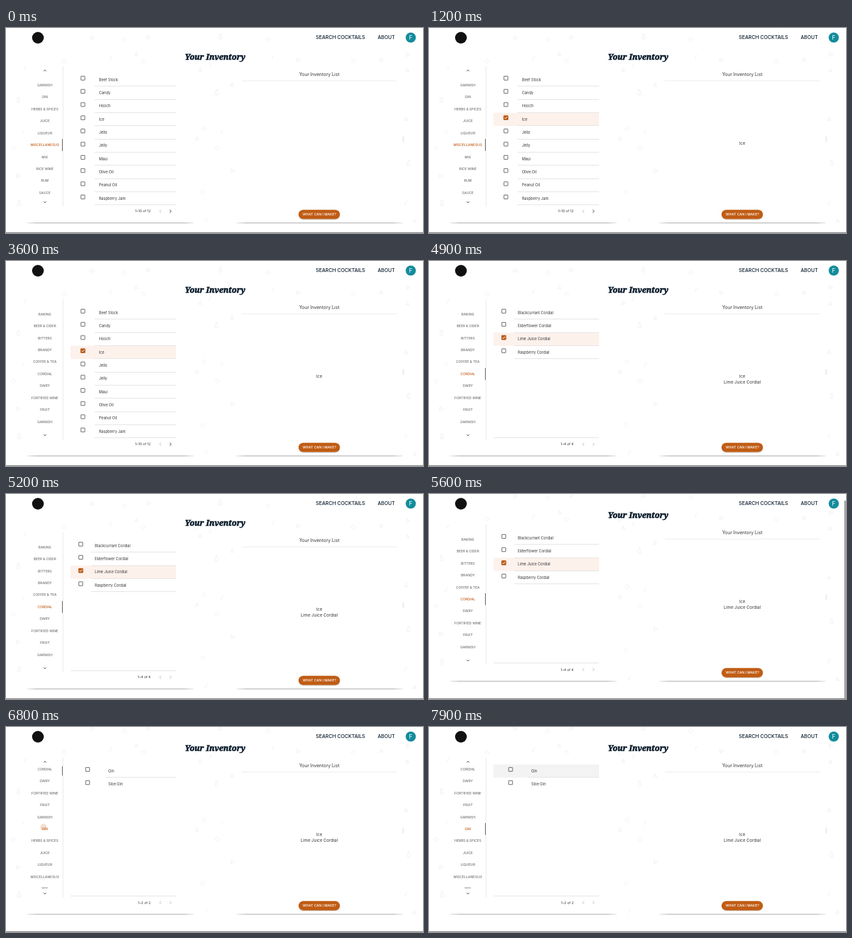
Recreate the animation shown at these times as an HTML page. Size 640 by 316 pixels, loop 8 s.

```html
<!DOCTYPE html>
<html lang="en">
<head>
<meta charset="utf-8">
<title>Your Inventory</title>
<style>
  html, body { margin: 0; width: 100%; height: 100%; overflow: hidden; background: #fff; }
  svg { display: block; width: 100vw; height: 100vh; }
  text { font-family: Inter, "Open Sans", sans-serif; fill: #333; }
  .title { font-family: "Noto Serif", serif; font-weight: 900; font-style: italic; fill: #0b1c2c; stroke: #0b1c2c; stroke-width: .65; }
  .nav { fill: #0b1c2c; font-weight: 500; }
  .tab { fill: #707070; font-weight: 500; }
  .tab.on { fill: #c05c14; }
  .white { fill: #fff; font-weight: 500; }
  .initial { fill: #fff; }
  .line { stroke: #e4e4e4; stroke-width: 1; shape-rendering: crispEdges; }
  .box { fill: none; stroke: #555; stroke-width: .9; }
  .icon { fill: none; stroke: #333; stroke-width: 1; }
  .icon.off { stroke: #bbb; }
  .doodle { fill: none; stroke: #ededed; stroke-width: .8; }
</style>
</head>
<body>
<svg viewBox="0 0 640 316" preserveAspectRatio="none">
  <defs>
    <clipPath id="tabView"><rect x="30" y="72.5" width="60" height="188.3"/></clipPath>
    <linearGradient id="edge">
      <stop offset="0" stop-color="#aaa" stop-opacity=".3"/>
      <stop offset=".06" stop-color="#aaa"/>
      <stop offset=".94" stop-color="#aaa"/>
      <stop offset="1" stop-color="#aaa" stop-opacity=".3"/>
    </linearGradient>
  </defs>
  <rect width="640" height="316" fill="#fff"/>
  <g id="page">
    <g id="doodles"></g>
    <g id="cards"></g>
    <g id="lists"></g>
    <g clip-path="url(#tabView)"><g id="tabs"></g></g>
  </g>
  <g id="header"></g>
</svg>
<script>
const LOOP = 8000, PITCH = 18.41, ROW = 20.35, ORANGE = '#c05c14';
const $ = id => document.getElementById(id);

function add(parent, tag, attrs) {
  const el = document.createElementNS('http://www.w3.org/2000/svg', tag);
  for (const key in attrs) el.setAttribute(key, attrs[key]);
  return parent.appendChild(el);
}
// y is the middle of the capitals
function label(parent, x, y, size, str, cls = '', anchor = 'middle') {
  const el = add(parent, 'text', { x, y: y + size * .36, 'font-size': size, class: cls, 'text-anchor': anchor });
  el.textContent = str;
  return el;
}
const rect = (parent, x, y, width, height, fill, rx = 0) => add(parent, 'rect', { x, y, width, height, fill, rx });
const hline = (parent, x1, x2, y) => add(parent, 'line', { x1, x2, y1: y, y2: y, class: 'line' });
const icon = (parent, d, cls = '') => add(parent, 'path', { d, class: 'icon ' + cls });
const show = (el, on) => el.setAttribute('visibility', on ? 'visible' : 'hidden');
const move = (el, y) => el.setAttribute('transform', `translate(0 ${y})`);

// Background doodles
const shapes = ['M0-3.5 3.5 0 0 3.5-3.5 0Z', 'M-2.5-3 3 0-2.5 3Z', 'M-1-4h2v3l1 1v4h-4v-4l1-1Z', 'M-2 3Q-1-3 2-3', 'M-2.5 2.5 0-2.5 2.5 2.5Z'];
const spots = [
  [[182, 18], [89, 51], [211, 51], [533, 51], [11, 185], [304, 155], [302, 253], [324, 185], [292, 51], [402, 18]],
  [[133, 15], [219, 14], [19, 228], [348, 220], [449, 49], [617, 41]],
  [[19, 111], [323, 99], [20, 270], [329, 13], [618, 208]],
  [[161, 47], [30, 62], [314, 58], [27, 160], [332, 160], [537, 9], [614, 270], [410, 45], [308, 296]],
  [[200, 40], [293, 170], [347, 87], [576, 48], [614, 140], [298, 64], [616, 65], [627, 297]]
];
spots.forEach((list, i) => list.forEach(([x, y]) =>
  add($('doodles'), 'path', { d: shapes[i], class: 'doodle', transform: `translate(${x} ${y})` })));

// Cards
const cards = $('cards');
for (const [x, w] of [[32, 256], [353.5, 255.5]]) {
  rect(cards, x, 57, w, 243, '#fff');
  rect(cards, x, 300, w, 1, 'url(#edge)');
}
rect(cards, 609, 167, .7, 9, '#ccc');
label(cards, 321, 44.8, 12, 'Your Inventory', 'title');
label(cards, 480.8, 71, 7, 'Your Inventory List');
hline(cards, 362, 600, 81.5).setAttribute('opacity', .7);
rect(cards, 87, 59, 1, 216, '#eaeaea');
const upArrow = icon(cards, 'M58 66.5l1.8-1.8 1.8 1.8');
icon(cards, 'M58 267.5l1.8 1.8 1.8-1.8');
const picked = [label(cards, 480.7, 177.7, 6.5, 'Ice'), label(cards, 480.7, 186.7, 6.5, 'Lime Juice Cordial')];
rect(cards, 449, 281.6, 63.5, 14.4, '#000', 7.2).setAttribute('opacity', .13);
rect(cards, 449, 280.2, 63.5, 14.4, ORANGE, 7.2);
label(cards, 481, 287.4, 5.3, 'WHAT CAN I MAKE?', 'white');

// Ingredient lists
function makeList({ items, boxX, textX, lineX, lines, range, more, pick }) {
  const g = add($('lists'), 'g', {});
  const tint = rect(g, 99, 69.6 + ROW * (pick || 0), 162, ROW, pick ? '#fdf1ec' : '#f3f3f3');
  items.forEach((name, i) => {
    const y = 77.3 + ROW * i;
    add(g, 'rect', { x: boxX - 3, y: y - 3, width: 6, height: 6, rx: .3, class: 'box' });
    label(g, textX, y + 2.2, 5.7, name, '', 'start');
    if (i < lines) hline(g, lineX, 261, y + 12.4);
  });
  if (items.length < 10) hline(g, 99, 261, 272.4);
  const check = add(g, 'g', {});
  if (pick) {
    const y = 77.3 + ROW * pick;
    rect(check, boxX - 3.5, y - 3.5, 7, 7, ORANGE, .6);
    add(check, 'path', { d: `M${boxX - 2.1} ${y}l1.5 1.5 2.8-3`, fill: 'none', stroke: '#fff' });
  }
  label(g, 222, 282.5, 5.3, range, '', 'end');
  icon(g, 'M238 280.3l-2.2 2.2 2.2 2.2', 'off');
  icon(g, 'M251.4 280.3l2.2 2.2-2.2 2.2', more ? '' : 'off');
  return { g, tint, check };
}
const misc = makeList({
  items: ['Beef Stock', 'Candy', 'Hooch', 'Ice', 'Jello', 'Jelly', 'Maui', 'Olive Oil', 'Peanut Oil', 'Raspberry Jam'],
  boxX: 118, textX: 142.7, lineX: 136, lines: 10, range: '1–10 of 12', more: true, pick: 3
});
const cordial = makeList({
  items: ['Blackcurrant Cordial', 'Elderflower Cordial', 'Lime Juice Cordial', 'Raspberry Cordial'],
  boxX: 114.8, textX: 136.3, lineX: 131, lines: 4, range: '1–4 of 4', pick: 2
});
const gin = makeList({
  items: ['Gin', 'Sloe Gin'],
  boxX: 125.2, textX: 157, lineX: 152, lines: 1, range: '1–2 of 2'
});

// Category tabs
const tabs = $('tabs');
const tabY = i => 82 + PITCH * i;
const ripple = add(tabs, 'ellipse', { fill: ORANGE });
const names = ['BAKING', 'BEER & CIDER', 'BITTERS', 'BRANDY', 'COFFEE & TEA', 'CORDIAL', 'DAIRY', 'FORTIFIED WINE', 'FRUIT',
  'GARNISH', 'GIN', 'HERBS & SPICES', 'JUICE', 'LIQUEUR', 'MISCELLANEOUS', 'MIX', 'RICE WINE', 'RUM', 'SAUCE'];
const tabLabels = names.map((name, i) => label(tabs, 59.6, tabY(i), 5.15, name, 'tab'));
const marker = rect(tabs, 86, 0, 1, PITCH, '#6b625c');
const CORDIAL = 5, GIN = 10, MISC = 14;

// Header
const header = $('header');
add(header, 'circle', { cx: 49, cy: 15, r: 9, fill: '#111' });
label(header, 513.4, 14.7, 7.55, 'SEARCH COCKTAILS', 'nav');
label(header, 583.7, 14.7, 7.45, 'ABOUT', 'nav');
add(header, 'circle', { cx: 621.2, cy: 14.7, r: 7.8, fill: '#128c9c' });
label(header, 621.2, 14.8, 9, 'F', 'initial');
rect(header, 0, 315, 640, 1, '#777');
const scrollbar = rect(header, 637.6, 10, 2, 305, '#888', 1);

// Motion
const ease = (t, start, length) => {
  const p = Math.min(1, Math.max(0, (t - start) / length));
  return p * p * (3 - 2 * p);
};
const wheel = [[1550, -45.8], [2400, -45.8], [2980, -40], [3280, -27.9], [5750, 48.5], [6030, 48.5]];
const clickCordial = 3900, clickGin = 6750;

function render(t) {
  const scroll = wheel.reduce((sum, [start, by]) => sum + by * ease(t, start, 250), 159.5);
  const active = t < clickCordial ? MISC : t < clickGin ? CORDIAL : GIN;
  move($('page'), -11.9 * ease(t, 5300, 220));
  move(tabs, -scroll);
  show(upArrow, scroll > 1);
  tabLabels.forEach((el, i) => el.classList.toggle('on', i === active));
  const at = MISC + (CORDIAL - MISC) * ease(t, clickCordial, 300) + (GIN - CORDIAL) * ease(t, clickGin + 40, 300);
  marker.setAttribute('y', tabY(at) - PITCH / 2);

  const age = t - (active === GIN ? clickGin : clickCordial);
  const grow = ease(age, -60, 400);
  ripple.setAttribute('cx', 57.5);
  ripple.setAttribute('cy', tabY(active) - 3);
  ripple.setAttribute('rx', 26 * grow);
  ripple.setAttribute('ry', Math.min(8, 26 * grow));
  ripple.setAttribute('opacity', active === MISC ? 0 : .2 * (1 - ease(age, 100, 400)));

  [[misc, MISC, 100], [cordial, CORDIAL, 4700], [gin, GIN, 7400]].forEach(([list, tab, from]) => {
    const on = active === tab;
    show(list.g, on);
    show(list.tint, on && t >= from);
    show(list.check, on && t >= from);
  });
  show(picked[0], t >= 100);
  show(picked[1], t >= 4700);
  scrollbar.setAttribute('opacity', ease(t, 5280, 80) * (1 - ease(t, 6000, 300)));
}

const begin = performance.now();
function tick() {
  render((performance.now() - begin) % LOOP);
  requestAnimationFrame(tick);
}
tick();
</script>
</body>
</html>
```
